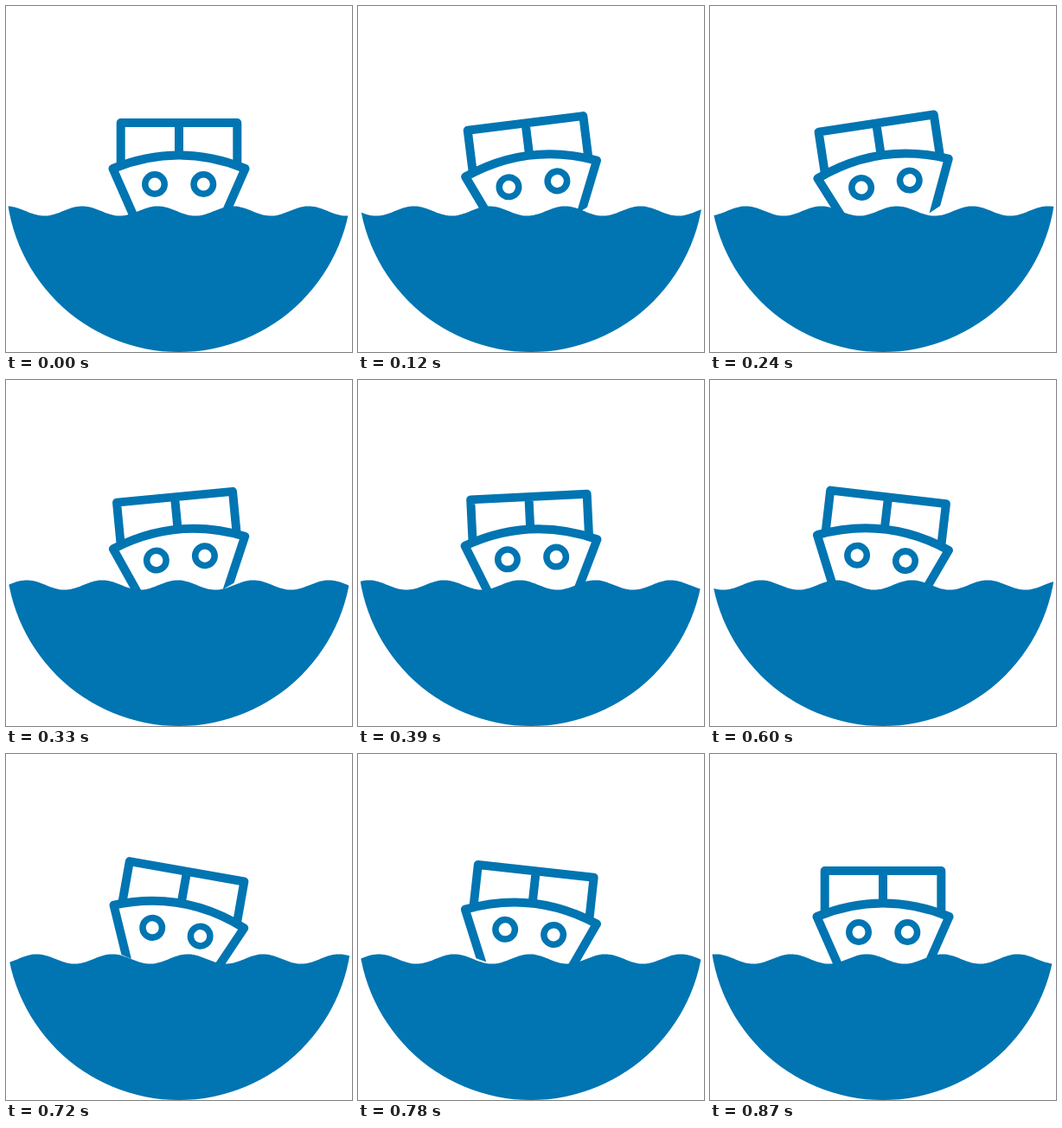
Recreate the animation shown at these times as an HTML page. Size 400 by 400 pixels, loop 930 ms.

```html
<!DOCTYPE html>
<html lang="en">
<head>
<meta charset="utf-8">
<title>Boat on waves</title>
<style>
  html, body { margin: 0; width: 100%; height: 100%; overflow: hidden; background: #fff; }
  svg { display: block; width: 100%; height: 100%; }
</style>
</head>
<body>
<svg viewBox="0 0 400 400">
  <clipPath id="disc"><circle cx="200" cy="200" r="200"/></clipPath>
  <clipPath id="keel"><path d="M100 100H300V221L258.6 240.5L245.6 246.6L154 245.6L141.5 242.7L100 233Z"/></clipPath>
  <g id="boat" clip-path="url(#keel)" fill="none" stroke="#0075b2" stroke-width="10" stroke-linejoin="round">
    <path d="M132.7 183V135H267.3V183M200 135V172"/>
    <path d="M154.3 258L123.5 188Q200 157 276.5 188L245.7 258"/>
    <g stroke-width="7.5">
      <circle cx="172" cy="206" r="11.25"/>
      <circle cx="228.3" cy="206" r="11.25"/>
    </g>
  </g>
  <path id="sea" clip-path="url(#disc)" fill="#0075b2"/>
</svg>
<script>
  const LOOP = 930, STEP = 30, LAST = 29;
  const WAVELENGTH = 87.3, WAVE_SPEED = WAVELENGTH / 15;
  const TILT = [[0, 0], [6, -10], [24, 10], [LAST, 0]];
  const boat = document.getElementById('boat');
  const sea = document.getElementById('sea');

  // Halfway between linear and sinusoidal easing
  const ease = p => (p + 0.5 - Math.cos(Math.PI * p) / 2) / 2;

  function tiltAt(step) {
    const i = Math.max(1, TILT.findIndex(([s]) => s >= step));
    const [s0, a0] = TILT[i - 1], [s1, a1] = TILT[i];
    return a0 + (a1 - a0) * ease((step - s0) / (s1 - s0));
  }

  function seaPath(crest) {
    let d = 'M0 400';
    for (let x = 0; x <= 400; x += 2) {
      const y = 237 - 5.6 * Math.cos((x - crest) / WAVELENGTH * 2 * Math.PI);
      d += `L${x} ${y.toFixed(2)}`;
    }
    return d + 'V400Z';
  }

  function draw(now) {
    const step = Math.min(LAST, Math.floor((now % LOOP) / STEP));
    boat.setAttribute('transform', `rotate(${tiltAt(step)} 200 187.5)`);
    sea.setAttribute('d', seaPath(88 - WAVE_SPEED * step));
  }

  const start = performance.now();
  function tick() {
    draw(performance.now() - start);
    requestAnimationFrame(tick);
  }
  tick();
</script>
</body>
</html>
```
